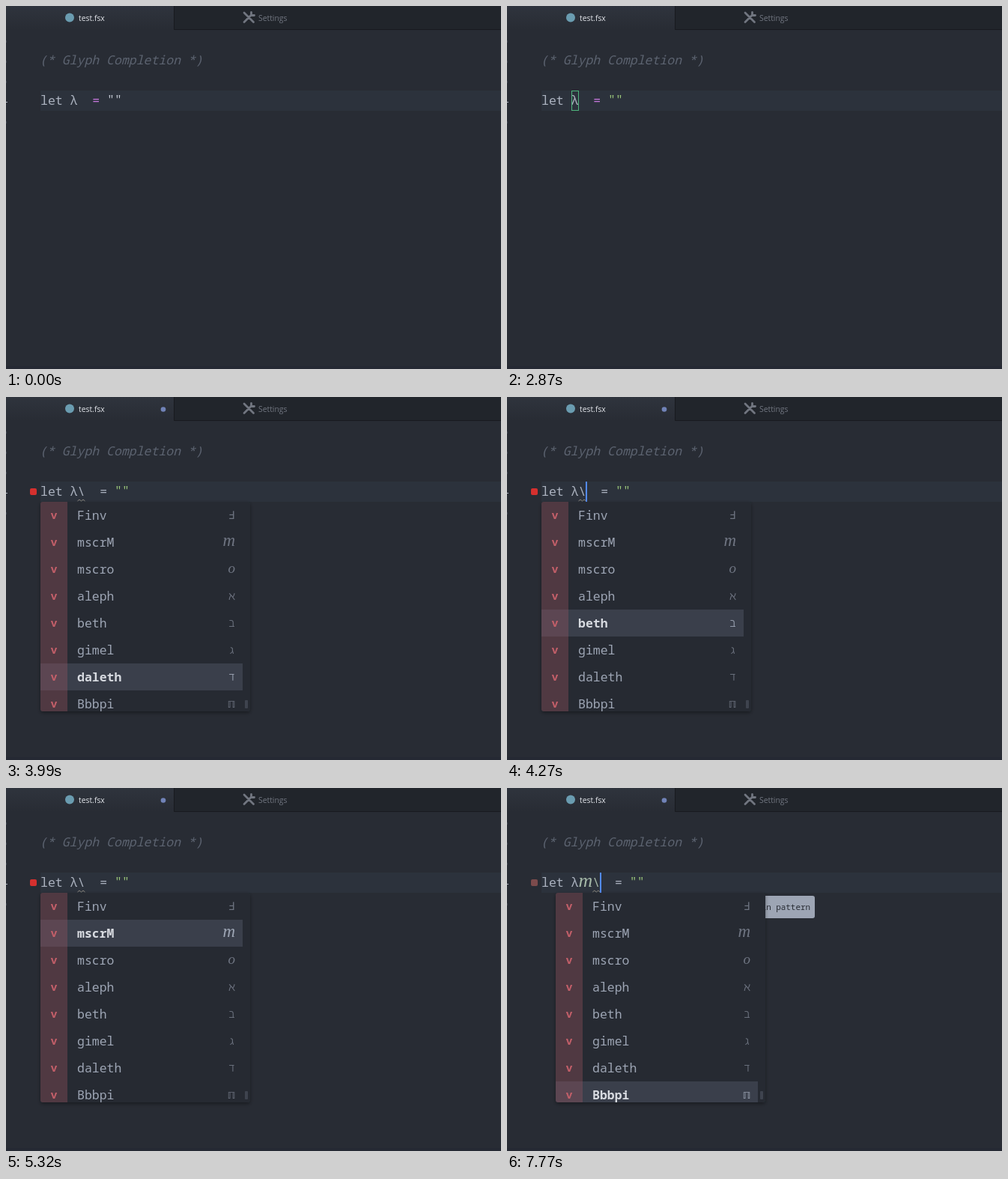
An HTML page that plays this animation: 661 by 485 pixels, repeating every 8 s.

```html
<!DOCTYPE html>
<html lang="en">
<head>
<meta charset="utf-8">
<title>Glyph completion</title>
<style>
  html, body { margin: 0; width: 100%; height: 100%; overflow: hidden; background: #282c34; }
  svg { display: block; width: 661px; height: 485px; }
  text { white-space: pre; font: 16.5px "Noto Sans Mono", "DejaVu Sans Mono", monospace; fill: #abb2bf; }
  .tab { font: 10.4px "Open Sans", "Noto Sans", sans-serif; }
  .kind { font-size: 15px; font-weight: 700; fill: #c25f69; text-anchor: middle; }
  .name { fill: #9da5b4; }
  .picked { font-weight: 600; fill: #d7dae0; }
  .glyph { font-size: 15px; fill: #6f7582; text-anchor: end; }
  .script { font: italic 26px "Liberation Serif", "Noto Serif", serif; }
  .glyph.script { font-size: 23px; }
  .small { font: italic 19px "Liberation Serif", "Noto Serif", serif; }
  .bold { font: bold 12px "DejaVu Sans", sans-serif; }
</style>
</head>
<body>
<svg viewBox="0 0 661 485">
  <defs>
    <clipPath id="list"><rect width="280" height="280" rx="3"/></clipPath>
    <filter id="shadow" x="-10%" y="-10%" width="120%" height="120%">
      <feDropShadow dx="0" dy="2" stdDeviation="2.5" flood-color="#000" flood-opacity=".4"/>
    </filter>
    <linearGradient id="sheen" x2="0" y2="1">
      <stop stop-color="#2f343d"/><stop offset="1" stop-color="#282c34"/>
    </linearGradient>
  </defs>
  <rect width="661" height="485" fill="#282c34"/>
  <rect y="481" width="661" height="4" fill="#252933"/>
  <rect width="224" height="32" fill="url(#sheen)"/>
  <rect x="224" width="437" height="32" fill="#21252b"/>
  <path d="M224.5 0V31.5H661" fill="none" stroke="#181a1f"/>
  <circle cx="85" cy="15.5" r="6" fill="#6a9cb0"/>
  <text class="tab" x="97" y="20" style="fill:#e2e5ea">test.fsx</text>
  <g fill="none" stroke="#717680" stroke-linecap="round" stroke-width="2.8">
    <path d="M318 9L330.500 21.500M318 21.500L327 12.500M327.500 8.500V12.500H331.500"/>
  </g>
  <text class="tab" x="337" y="20" style="fill:#717680">Settings</text>
  <text x="45" y="78" style="fill:#5c6370;font-style:italic">(* Glyph Completion *)</text>
  <g id="scene"></g>
</svg>
<script>
const LOOP = 8000, LEFT = 46, CELL = 9.9, GLYPH_W = 18.8, ROW = 36;
const BLINK = 420, STEP = 140;

// The keystrokes; everything else follows from them.
const DOWN = 630, UP = 1400, RIGHT = 1610, PAST_WORD = 2310;
const TYPE = 3220, ACCEPT = 5880, TYPE_AGAIN = 6790;
const CLIMB = 3850, STEP_BACK = 5320;

const scene = document.getElementById("scene");
const firstPage = [["PropertyLine", "?"], ["exclam", "!"], ["mathdollar", "$"], ["percent", "%"],
  ["ampersand", "&amp;"], ["lparen", "("], ["rparen", ")"], ["plus", "+"]];
const lastPage = [["Finv", "Ⅎ"], ["mscrM", "m", "script"], ["mscro", "o", "small"], ["aleph", "ℵ"],
  ["beth", "ℶ"], ["gimel", "ℷ"], ["daleth", "ℸ"], ["Bbbpi", "ℿ", "bold"]];

const clamp = (v, lo, hi) => Math.min(hi, Math.max(lo, v));

function stateAt(t) {
  const glyph = t >= ACCEPT;
  const typed = t >= TYPE_AGAIN ? TYPE_AGAIN : TYPE;
  const slash = t >= TYPE && !(t >= ACCEPT && t < TYPE_AGAIN);
  const sinceType = slash ? t - typed : -1;
  const wrapped = sinceType >= 3.5 * STEP;
  const climbed = glyph ? 0 : clamp(Math.floor((t - CLIMB) / STEP), 0, 7);
  const settled = PAST_WORD + STEP, cleaned = ACCEPT + STEP / 2;
  const rest = [DOWN, UP, settled, TYPE, cleaned, TYPE_AGAIN].filter(start => start <= t).pop();
  const columns = t < RIGHT ? 0 : t < PAST_WORD ? Math.min(4, 1 + Math.floor((t - RIGHT) / STEP)) : 5;
  return {
    glyph, slash,
    line: t >= DOWN && t < UP ? 5 : 4,
    column: columns + glyph + slash,
    cursor: (t - rest) % (2 * BLINK) < BLINK,
    outline: slash ? sinceType < 2.5 * STEP : t >= settled && (!glyph || t >= ACCEPT + 2.5 * STEP),
    page: sinceType < 1.5 * STEP ? null : wrapped ? lastPage : firstPage,
    picked: wrapped ? 7 - climbed + (!glyph && t >= STEP_BACK) : 0,
    modified: t >= TYPE + 2.5 * STEP,
    error: slash && sinceType >= (glyph ? 7 : 3) * STEP,
    edited: t >= TYPE,
    focused: t < DOWN
  };
}

const rect = (x, y, w, h, fill, extra = "") =>
  `<rect x="${x}" y="${y}" width="${w}" height="${h}" fill="${fill}" ${extra}/>`;
const text = (x, y, content, extra = "") => `<text x="${x}" y="${y}" ${extra}>${content}</text>`;
const lineTop = line => 5 + line * 27;

function gutter(active) {
  let out = "";
  for (let line = 1; line <= 5; line++)
    out += line === active ? rect(0, lineTop(line) + 15, 2, 1, "#abb2bf")
      : rect(0, lineTop(line) + 14, 1, 3, "#3d434e");
  return out;
}

function codeLine(s, wordEnd) {
  const start = LEFT + 4 * CELL;
  const tint = s.glyph ? 'style="fill:#a5b9a8"' : "";
  return text(LEFT, 132, "let") + text(start, 132, "λ")
    + (s.glyph ? text(start + CELL, 132, "m", `class="script" ${tint}`) : "")
    + (s.slash ? text(wordEnd - CELL, 132, "\\", tint) : "")
    + text(wordEnd + 2 * CELL, 132, "=", `style="fill:${s.edited ? "#abb2bf" : "#c678dd"}"`)
    + text(wordEnd + 4 * CELL, 131, '""', `style="fill:${s.focused ? "#c0c6d0" : "#98c379"}"`);
}

function popupRow([name, glyph, font = ""], i, picked) {
  const y = i * ROW, on = i === picked;
  const symbol = glyph === "?"
    ? rect(252.5, y + 13.5, 7, 9, "none", 'stroke="#9299a6"')
      + text(256, y + 21.5, glyph, 'style="font-size:8px;text-anchor:middle"')
    : text(260, y + 23, glyph, `class="glyph ${font}" ${on ? 'style="fill:#9da5b4"' : ""}`);
  return (on ? rect(36, y, 234, ROW, "#3a3f4b") : "")
    + rect(0, y, 36, ROW, on ? "#5c4652" : "#503942")
    + text(18, y + 22.5, "v", 'class="kind"')
    + text(49, y + 24, name, `class="name ${on ? "picked" : ""}"`) + symbol;
}

function popup(s) {
  const thumb = s.page === firstPage ? 3 : 265;
  return `<g transform="translate(${s.glyph ? LEFT + 19 : LEFT} 140)">`
    + rect(0, 0, 280, 280, "#272b33", 'rx="3" filter="url(#shadow)"')
    + `<g clip-path="url(#list)">${s.page.map((row, i) => popupRow(row, i, s.picked)).join("")}`
    + rect(273, thumb, 4, 11, "#3e434e", 'rx="1"') + "</g></g>";
}

function errorMark(s, wordEnd) {
  const x = wordEnd - CELL;
  return rect(32, 122, 9, 9, s.glyph ? "#7c4b4c" : "#d5302e", 'rx="2"')
    + `<path d="M${x} 139l2.500-2 2.500 2 2.500-2 2.500 2" fill="none" stroke="#8d8980"/>`
    + (s.glyph ? rect(200, 144, 211, 30, "#9da5b4", 'rx="3"')
      + text(405, 163, "in pattern", 'text-anchor="end" style="font-size:10.900px;fill:#282c34"') : "");
}

function draw(s) {
  const wordEnd = LEFT + (5 + s.slash) * CELL + (s.glyph ? GLYPH_W : 0);
  const cursorX = Math.round(LEFT + s.column * CELL + (s.glyph ? GLYPH_W - CELL : 0));
  scene.innerHTML = rect(LEFT, lineTop(s.line), 615, 27, "#2c323c") + gutter(s.line)
    + (s.modified ? '<circle cx="210" cy="16.500" r="3.300" fill="#7183b8"/>' : "")
    + codeLine(s, wordEnd)
    + (s.outline ? rect(86.5, 113.5, Math.round(wordEnd) - 87, 26, "none", 'stroke="#4fb57d"') : "")
    + (s.cursor ? rect(cursorX, lineTop(s.line), 2, 27, "#528bff") : "")
    + (s.error ? errorMark(s, wordEnd) : "")
    + (s.page ? popup(s) : "");
}

let lastKey = "";
function tick() {
  const state = stateAt(performance.now() % LOOP);
  const key = JSON.stringify(state);
  if (key !== lastKey) draw(state);
  lastKey = key;
  requestAnimationFrame(tick);
}
tick();
</script>
</body>
</html>
```
